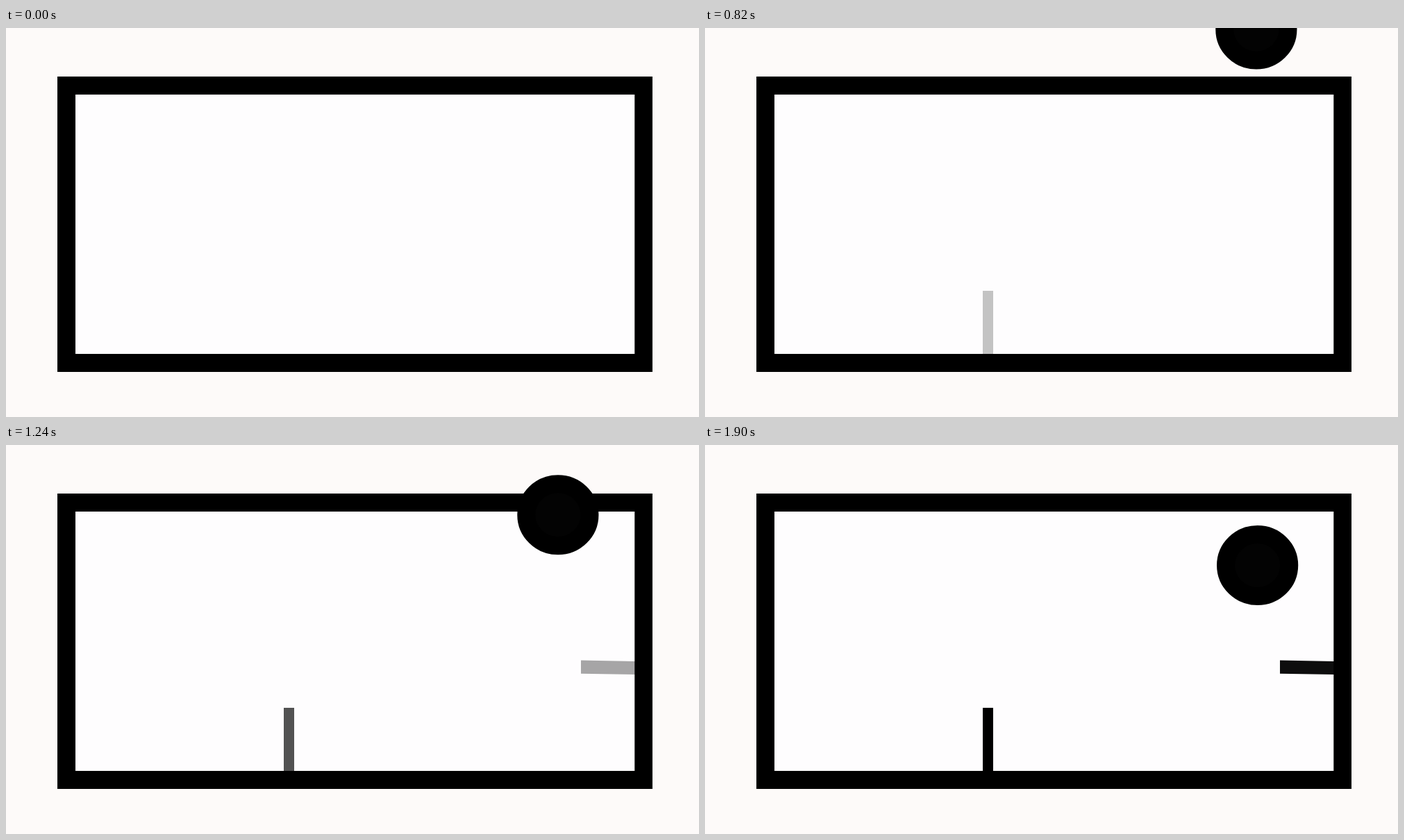
An HTML page that plays this animation: 998x561 px, repeating every 2600 ms.

```html
<!DOCTYPE html>
<html lang="en">
<head>
<meta charset="utf-8">
<title>Ball and frame</title>
<style>
  html, body { margin: 0; width: 100%; height: 100%; overflow: hidden; background: #fdfaf9; }
  svg { display: block; width: 998px; height: 561px; }
</style>
</head>
<body>
<svg viewBox="0 0 998 561">
  <rect x="87" y="83" width="831" height="400" fill="#fefdfe"/>
  <rect id="post" x="400" y="379" width="15" height="92" opacity="0"/>
  <path id="shelf" d="M828 310.5L906 312V331L828 329.8Z" opacity="0"/>
  <path d="M74 70H931V496H74ZM100 96V470H905.3V96Z" fill-rule="evenodd"/>
  <ellipse id="ball" cy="-99" rx="45.6" ry="44.5" fill="#030303" stroke="#000" stroke-width="26"/>
</svg>
<script>
  const LOOP = 2600, STEP = 20;
  const [post, shelf, ball] = ['post', 'shelf', 'ball'].map(id => document.getElementById(id));
  const progress = (t, from, to) => Math.min(1, Math.max(0, (t - from) / (to - from)));
  const start = performance.now();

  function draw(now) {
    const elapsed = Math.max(0, now - start) % LOOP;
    const t = Math.floor(elapsed / STEP) * STEP;

    // The ball drops in a straight line and stops at 1550 ms.
    const fall = Math.min(t, 1550) - 580;
    ball.setAttribute('cx', 793.3 + fall * 0.0024);
    ball.setAttribute('cy', -54.4 + fall * 0.235);

    post.setAttribute('opacity', progress(t, 600, 1550));
    shelf.setAttribute('opacity', 0.95 * progress(t, 856, 1900));
    requestAnimationFrame(draw);
  }
  draw(start);
</script>
</body>
</html>
```
